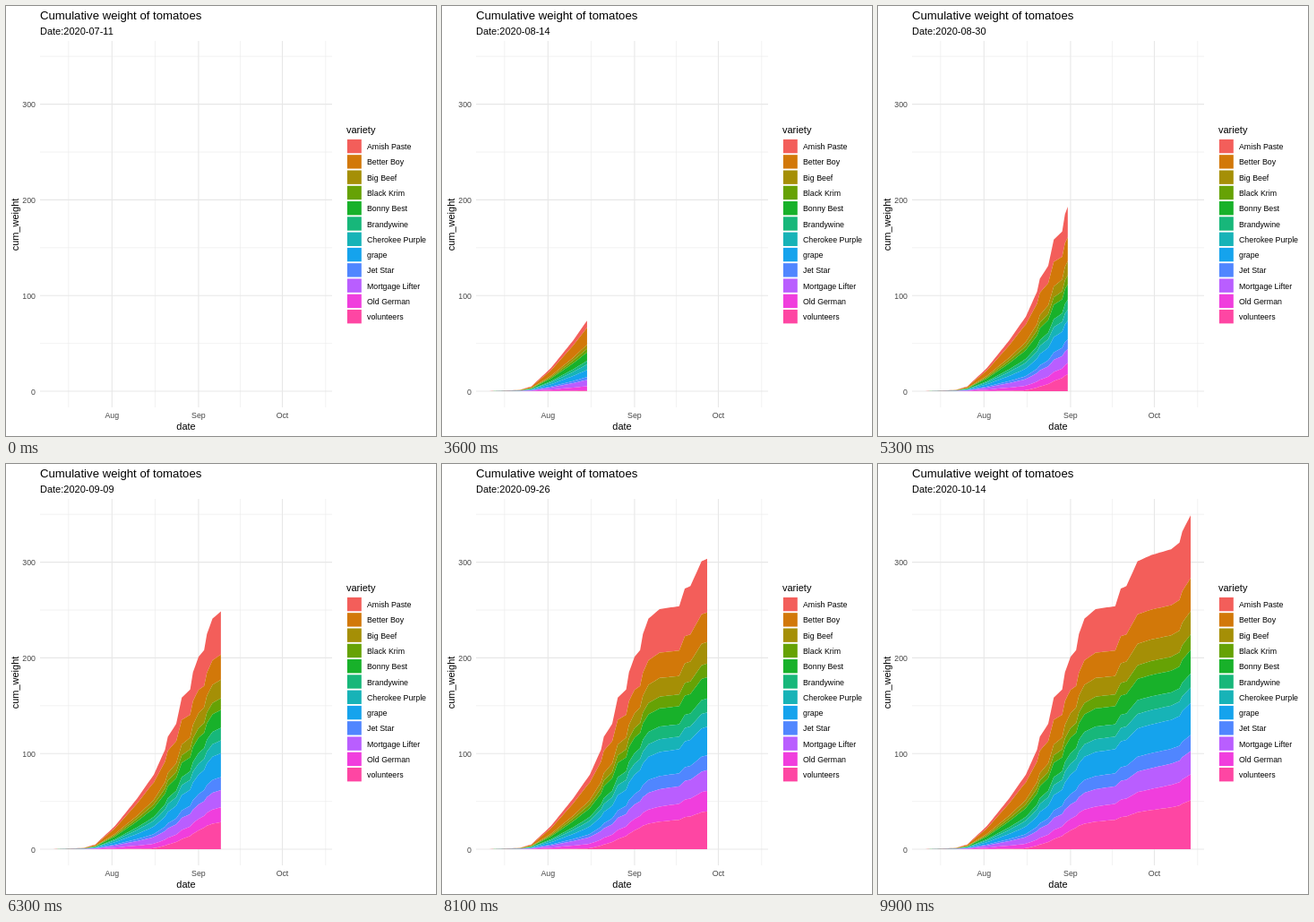
Recreate the animation shown at these times as an HTML page with a canvas. Size 480x480 px, loop 10000 ms.

```html
<!DOCTYPE html>
<html lang="en">
<head>
<meta charset="utf-8">
<title>Cumulative weight of tomatoes</title>
<style>
  html, body { margin: 0; width: 100%; height: 100%; overflow: hidden; background: #fff; }
  canvas { display: block; width: 480px; height: 480px; }
</style>
</head>
<body>
<canvas id="stage" width="480" height="480"></canvas>
<script>
const ctx = document.getElementById('stage').getContext('2d');

const STEPS = 100, STEP_MS = 100, LAST_DAY = 95;
const START = Date.UTC(2020, 6, 11), DAY_MS = 864e5;

// name, colour, percent of the harvest early, in the middle and at the end
const varieties = [
  ['Amish Paste', '#f35e5a', 10, 18, 18.8],
  ['Better Boy', '#d27809', 24, 10.7, 9.9],
  ['Big Beef', '#a58f06', 6, 7.9, 7],
  ['Black Krim', '#66a205', 5, 5, 4.6],
  ['Bonny Best', '#18b12a', 12, 7.6, 7.1],
  ['Brandywine', '#17b77a', 5, 5.5, 4.2],
  ['Cherokee Purple', '#17b3b7', 8, 5.5, 4.6],
  ['grape', '#15a3ed', 10, 10.1, 9.6],
  ['Jet Star', '#5086ff', 4, 5.6, 4.8],
  ['Mortgage Lifter', '#b95eff', 9, 7.3, 7],
  ['Old German', '#f03edd', 6, 6, 7.8],
  ['volunteers', '#fe46a3', 1, 10.8, 14.6]
];
const EARLY = 35, MIDDLE = 54;

// day and total weight where the pace of picking changes
const totals = [
  [0, 0], [11, 1.4], [15, 5], [22, 24], [30, 53], [36, 78], [40, 104], [41, 117.5],
  [44, 131], [46, 158.5], [49, 167], [50, 185], [52, 201], [54, 208], [55, 225],
  [57, 241], [61, 251], [68, 254], [70, 272.5], [72, 275], [76, 301], [81, 307.5],
  [88, 313.5], [91, 320.5], [92, 332], [95, 349]
];

const px = day => 52.8 + day * 3.118;
const py = weight => 430 - weight * 1.068;

// Straight lines through [x, y] points, level beyond both ends.
function along(points, x) {
  const i = points.findIndex(p => p[0] >= x);
  if (i < 0) return points[points.length - 1][1];
  if (i === 0) return points[0][1];
  const [[x0, y0], [x1, y1]] = points.slice(i - 1, i + 1);
  return y0 + (y1 - y0) * (x - x0) / (x1 - x0);
}

// Layer edges for one day, from the top edge down to zero.
function edgesAt(day) {
  const shares = varieties.map(([, , early, middle, end]) =>
    along([[EARLY, early], [MIDDLE, middle], [LAST_DAY, end]], day));
  const unit = along(totals, day) / shares.reduce((a, b) => a + b);
  let rest = along(totals, day);
  return [rest, ...shares.map(s => rest -= s * unit)];
}

function text(str, x, y, size, color = '#000', align = 'left') {
  ctx.font = size + 'px "Liberation Sans", Arial, sans-serif';
  ctx.fillStyle = color;
  ctx.textAlign = align;
  ctx.fillText(str, x, y);
}

function line(x1, y1, x2, y2, width) {
  ctx.strokeStyle = '#e7e7e7';
  ctx.lineWidth = width;
  ctx.beginPath();
  ctx.moveTo(x1, y1);
  ctx.lineTo(x2, y2);
  ctx.stroke();
}

const vertical = (x, w) => line(x, 39, x, 448, w);
const horizontal = (y, w) => line(38, y, 364, y, w);

function drawGrid() {
  [69.8, 166.5, 261.5, 356.8].forEach(x => vertical(x, 0.55));
  [[21, 'Aug'], [52, 'Sep'], [82, 'Oct']].forEach(([day, name]) => {
    vertical(px(day), 1.07);
    text(name, px(day), 460, 8.8, '#444', 'center');
  });
  for (let w = 0; w <= 300; w += 100) {
    horizontal(py(w + 50), 0.55);
    horizontal(py(w), 1.07);
    text(w, 33, py(w) + 3.6, 8.8, '#444', 'right');
  }
}

function drawLabels(day) {
  const date = new Date(START + Math.floor(day) * DAY_MS);
  text('Cumulative weight of tomatoes', 38, 15, 13.2);
  text('Date:' + date.toISOString().slice(0, 10), 38, 32, 11);
  text('date', 201, 473, 11, '#000', 'center');
  ctx.save();
  ctx.translate(14, 244);
  ctx.rotate(-Math.PI / 2);
  text('cum_weight', 0, 0, 11, '#000', 'center');
  ctx.restore();
}

function drawLegend() {
  text('variety', 380, 142, 11);
  varieties.forEach(([name, color], i) => {
    const y = 156.7 + i * 17.28;
    ctx.fillStyle = color;
    ctx.fillRect(380.9, y - 7.8, 15.9, 15.4);
    text(name, 403, y + 3.45, 8.8);
  });
}

function drawAreas(end) {
  if (end <= 0) return;
  const columns = [];
  for (let day = 0; day <= end; day++) columns.push([px(day), edgesAt(day).map(py)]);
  varieties.forEach(([, color], i) => {
    ctx.fillStyle = color;
    ctx.beginPath();
    columns.forEach(([x, ys]) => ctx.lineTo(x, ys[i]));
    columns.slice().reverse().forEach(([x, ys]) => ctx.lineTo(x, ys[i + 1]));
    ctx.fill();
  });
}

function draw(ms) {
  const step = Math.floor(ms / STEP_MS) % STEPS;
  const day = LAST_DAY * step / (STEPS - 1);
  ctx.fillStyle = '#fff';
  ctx.fillRect(0, 0, 480, 480);
  drawGrid();
  drawAreas(Math.round(day)); // the area grows by whole days
  drawLabels(day);
  drawLegend();
}

const t0 = performance.now();
function tick() {
  draw(performance.now() - t0);
  requestAnimationFrame(tick);
}
tick();
</script>
</body>
</html>
```
